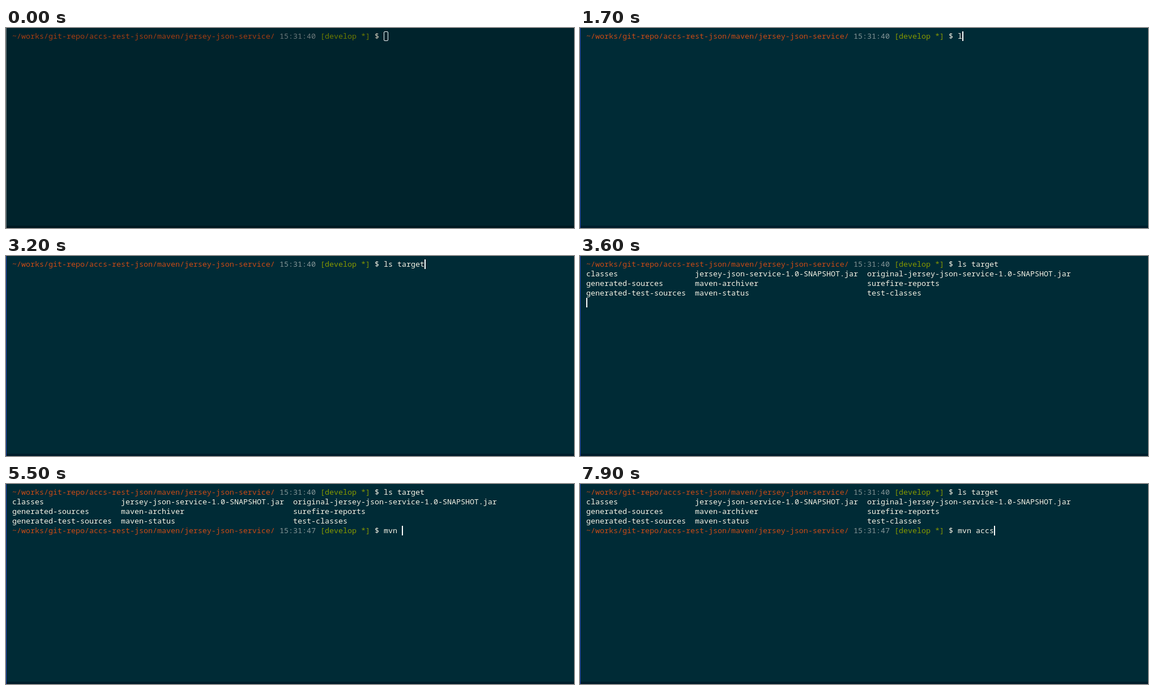
Animation of 1003x354 px, one loop 8000 ms. Source, as an HTML page with a canvas:

```html
<!DOCTYPE html>
<html lang="en">
<head>
<meta charset="utf-8">
<title>Terminal session</title>
<style>
  html, body { margin: 0; width: 100%; height: 100%; overflow: hidden; background: #002b36; }
  canvas { display: block; }
</style>
</head>
<body>
<canvas id="screen" width="1003" height="354"></canvas>
<script>
const ctx = document.getElementById('screen').getContext('2d');
const LOOP = 8000, LEFT = 11, TOP = 6, CELL = 8, ROW = 17, INPUT = 82;
const FONT = '13.333px "Noto Sans Mono", "DejaVu Sans Mono", monospace';
const PATH = '~/works/git-repo/accs-rest-json/maven/jersey-json-service/';

const ACTIVE = {
  back: '#002b36', edge: '#2347b5', foot: '#001d2b',
  path: '#cb4b16', time: '#839496', branch: '#859900', text: '#f6f3e6'
};
const INACTIVE = {
  back: '#00232c', edge: '#6f7d80', foot: '#001820',
  path: '#a53d12', time: '#6b787a', branch: '#6c7c00', text: '#d8d2bf'
};

const LISTING = [
  ['classes', 'jersey-json-service-1.0-SNAPSHOT.jar', 'original-jersey-json-service-1.0-SNAPSHOT.jar'],
  ['generated-sources', 'maven-archiver', 'surefire-reports'],
  ['generated-test-sources', 'maven-status', 'test-classes']
];
const COLUMNS = [0, 24, 62];

// [start ms, typed text, cursor visible]
const FIRST = [
  [0, '', true], [1300, '', false], [1700, 'l', true], [1800, 'ls ', true],
  [2100, 'ls t', true], [2200, 'ls ta', true], [2300, 'ls tar', true],
  [2800, 'ls tar', false], [3000, 'ls targ', true], [3100, 'ls targe', true],
  [3200, 'ls target', true], [3600, 'ls target', false]
];
const SECOND = [
  [4000, '', true], [4400, '', false], [4800, 'm', true], [5000, 'mv', true],
  [5300, 'mvn', true], [5500, 'mvn ', true], [6000, 'mvn ', false],
  [6300, 'mvn a', true], [6500, 'mvn ac', true], [6700, 'mvn acc', true],
  [6900, 'mvn accs', true], [7400, 'mvn accs', false], [7900, 'mvn accs', true]
];

const stateAt = (steps, t) => steps.filter(([start]) => start <= t).pop();

function write(text, col, row, color) {
  ctx.fillStyle = color;
  ctx.fillText(text, LEFT + col * CELL, TOP + row * ROW + 13);
}

function bar(col, row) {
  ctx.fillStyle = '#ffffff';
  ctx.fillRect(LEFT + col * CELL, TOP + row * ROW, 2, ROW);
}

function hollowCursor(col, row) {
  ctx.strokeStyle = '#ffffff';
  ctx.lineWidth = 1;
  ctx.beginPath();
  ctx.roundRect(LEFT + col * CELL + 0.5, TOP + row * ROW + 0.5, CELL - 1, ROW - 1, 1.5);
  ctx.stroke();
}

function prompt(row, clock, colors) {
  write(PATH, 0, row, colors.path);
  write(clock, 59, row, colors.time);
  write('[develop *]', 68, row, colors.branch);
  write('$', 80, row, colors.text);
}

function commandLine(row, clock, steps, t, colors) {
  const [, typed, cursor] = stateAt(steps, t);
  prompt(row, clock, colors);
  write(typed, INPUT, row, colors.text);
  if (t < 800) hollowCursor(INPUT, row);
  else if (cursor) bar(INPUT + typed.length, row);
}

function draw(t) {
  const colors = t < 800 ? INACTIVE : ACTIVE;
  ctx.font = FONT;
  ctx.textBaseline = 'alphabetic';
  ctx.fillStyle = colors.back;
  ctx.fillRect(0, 0, 1003, 354);
  ctx.fillStyle = colors.foot;
  ctx.fillRect(0, 350, 1003, 4);
  ctx.fillStyle = colors.edge;
  ctx.fillRect(0, 0, 1, 354);

  commandLine(0, '15:31:40', FIRST, t, colors);
  if (t < 3600) return;
  LISTING.forEach((names, i) =>
    names.forEach((name, j) => write(name, COLUMNS[j], i + 1, colors.text)));
  if (t < 4000) bar(0, 4);
  else commandLine(4, '15:31:47', SECOND, t, colors);
}

const begin = performance.now();
function tick() {
  draw((performance.now() - begin) % LOOP);
  requestAnimationFrame(tick);
}
tick();
</script>
</body>
</html>
```
